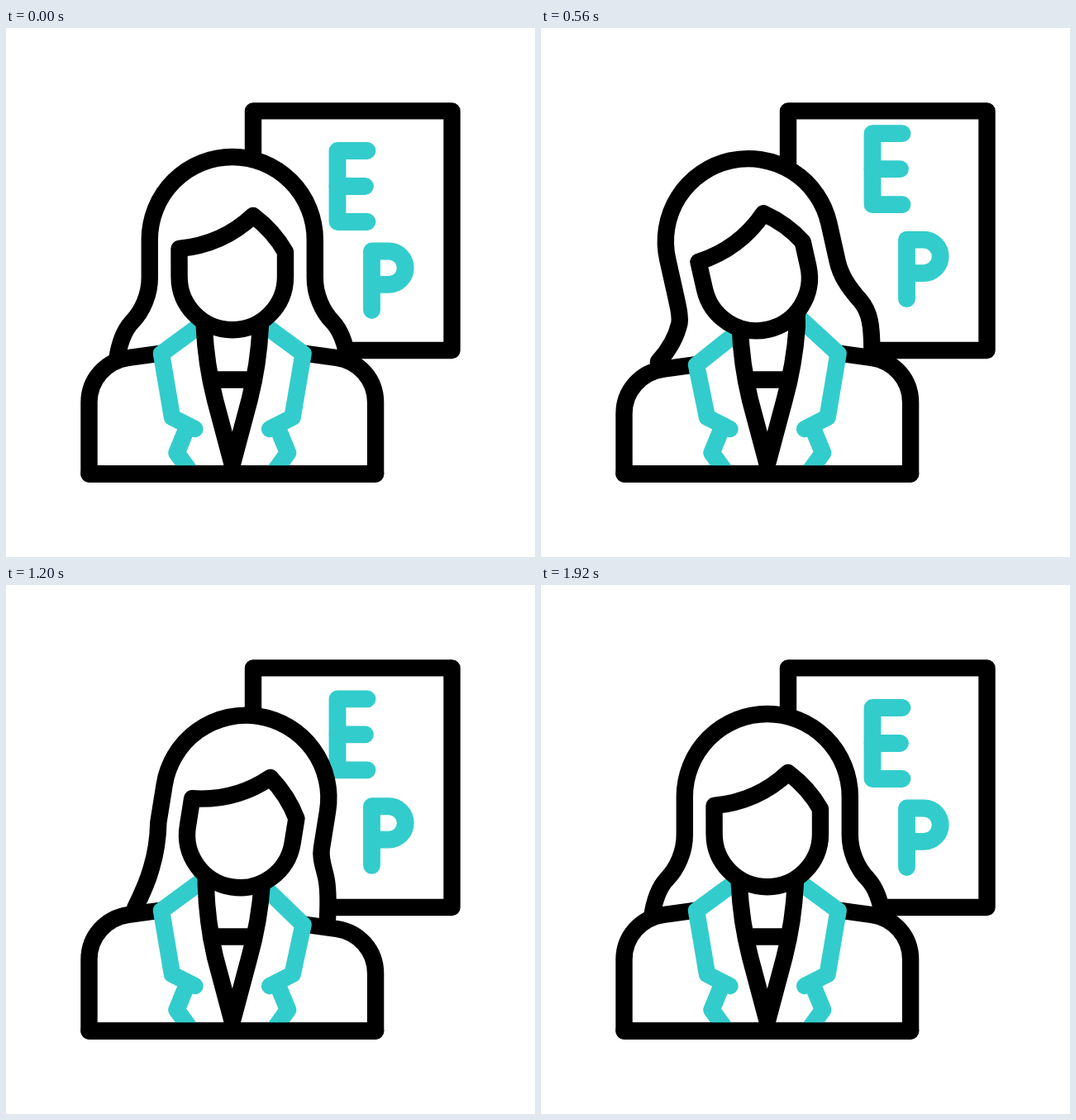
Animation of 640 by 640 pixels, one loop 2 s. Source, as an HTML page with a canvas:

```html
<!DOCTYPE html>
<html lang="en">
<head>
<meta charset="utf-8">
<title>Eye doctor icon</title>
<style>
  html, body { margin: 0; width: 100%; height: 100%; overflow: hidden; background: #fff; }
  canvas { display: block; width: 100vw; height: 100vh; }
</style>
</head>
<body>
<canvas id="stage" width="640" height="640"></canvas>
<script>
const ctx = document.getElementById('stage').getContext('2d');
const BLACK = '#000', TEAL = '#33cccc', WHITE = '#fff';
const LOOP = 2000, STEP = 40;
const CX = 273.8, LEFT = 100.5, RIGHT = 447.1, BASE = 539.5;
const PIVOT = [272, 361];

// Lower hair locks: two curves per side, from the head down to the shoulder.
const LOCK_REST = [174, 322, 165, 343, 152, 356, 142, 367, 137, 381, 134, 402];
const LOCKS = {
  left: {
    rest: LOCK_REST,
    tiltL: [165, 336, 169, 346, 168, 357, 165, 371, 157, 388, 142, 404],
    tiltR: [184, 305, 182, 322, 176, 342, 172, 357, 165, 373, 156, 391]
  },
  right: {
    rest: LOCK_REST.map((v, i) => i % 2 ? v : 2 * CX - v),
    tiltL: [362, 299, 372, 313, 386, 329, 398, 343, 400, 360, 400, 390],
    tiltR: [380, 330, 384, 340, 387, 353, 390, 366, 390, 383, 389, 404]
  }
};

function ease(t, from, to) {
  const x = Math.min(1, Math.max(0, (t - from) / (to - from)));
  return x * x * (3 - 2 * x);
}

// Two hops of 800 ms each.
function hop(t, start) {
  const p = t - start;
  if (p <= 0 || p >= 1600) return 0;
  const q = p % 800;
  return -21.4 * ease(q < 400 ? q : 800 - q, 0, 400);
}

function stroke(path, color, width = 20.4) {
  ctx.strokeStyle = color;
  ctx.lineWidth = width;
  ctx.stroke(path);
}

function fill(path) {
  ctx.fillStyle = WHITE;
  ctx.fill(path);
}

function poly(...pts) {
  const p = new Path2D();
  for (let i = 0; i < pts.length; i += 2) p.lineTo(pts[i], pts[i + 1]);
  return p;
}

function turn(x, y, a) {
  const dx = x - PIVOT[0], dy = y - PIVOT[1], c = Math.cos(a), s = Math.sin(a);
  return [PIVOT[0] + c * dx - s * dy, PIVOT[1] + s * dx + c * dy];
}

function lock(side, l, r) {
  const { rest, tiltL, tiltR } = LOCKS[side];
  return rest.map((v, i) => v * (1 - l - r) + tiltL[i] * l + tiltR[i] * r);
}

function hairPath(l, r, a) {
  const p = new Path2D();
  const n = lock('left', l, r), m = lock('right', l, r);
  const [cx, cy] = turn(CX, 256, a);
  p.moveTo(n[10], n[11]);
  p.bezierCurveTo(n[8], n[9], n[6], n[7], n[4], n[5]);
  p.bezierCurveTo(n[2], n[3], n[0], n[1], ...turn(CX - 100, 302, a));
  p.arc(cx, cy, 100, Math.PI + a, a);
  p.lineTo(...turn(CX + 100, 302, a));
  p.bezierCurveTo(...m.slice(0, 6));
  p.bezierCurveTo(...m.slice(6));
  return p;
}

function facePath(a) {
  const p = new Path2D();
  p.moveTo(...turn(209.5, 267, a));
  p.quadraticCurveTo(...turn(262, 262, a), ...turn(299, 227, a));
  p.quadraticCurveTo(...turn(324, 246, a), ...turn(338, 271, a));
  p.lineTo(...turn(338, 301, a));
  p.arc(...turn(CX, 301, a), 64.2, a, Math.PI + a);
  p.closePath();
  return p;
}

function bodyPath(dl, dr) {
  const p = new Path2D();
  p.moveTo(188, 393.5 + dl);
  p.lineTo(148, 399 + dl);
  p.bezierCurveTo(121, 403 + dl, LEFT, 425 + dl, LEFT, 453 + dl);
  p.lineTo(LEFT, BASE);
  p.lineTo(RIGHT, BASE);
  p.lineTo(RIGHT, 453 + dr);
  p.bezierCurveTo(RIGHT, 425 + dr, 427, 403 + dr, 400, 399 + dr);
  p.lineTo(360, 393.5 + dr);
  return p;
}

// side: 1 draws the left half, -1 its mirror image
const mirror = side => v => CX + side * (v - CX);

function lapel(side, drop, neckDrop) {
  const x = mirror(side);
  stroke(poly(x(235), 359.5 + neckDrop, x(188), 394 + drop, x(201), 471, x(228.5), 485), TEAL);
  stroke(poly(x(218), 486, x(206.5), 514, x(221), 534), TEAL);
}

function collar(side, shift) {
  const x = mirror(side);
  const p = new Path2D();
  p.moveTo(x(239.8) + shift, 344);
  p.lineTo(x(239.8) + shift, 362);
  p.quadraticCurveTo(x(242) + shift / 2, 407, x(253), 450);
  p.lineTo(x(CX), 528);
  stroke(p, BLACK);
}

function letters(t) {
  const e = hop(t, 200), p = 270 + hop(t, 320);
  stroke(poly(437, 148.5 + e, 401, 148.5 + e, 401, 234.5 + e, 437, 234.5 + e), TEAL, 20.8);
  stroke(poly(401, 191.5 + e, 434.5, 191.5 + e), TEAL, 20.8);
  const bowl = poly(442.5, p + 71.5, 442.5, p, 463, p);
  bowl.arc(463, p + 20.2, 20.2, -Math.PI / 2, Math.PI / 2);
  bowl.lineTo(442.5, p + 40.4);
  stroke(bowl, TEAL, 20.8);
}

function draw(t) {
  const l = ease(t, 200, 600) - ease(t, 760, 1200);
  const r = ease(t, 760, 1200) - ease(t, 1360, 1760);
  const a = (-13 * l + 9.1 * r) * Math.PI / 180;
  const dl = 14 * l, dr = 17 * r;

  ctx.fillStyle = WHITE;
  ctx.fillRect(0, 0, 640, 640);
  ctx.lineCap = ctx.lineJoin = 'round';

  const board = poly(299, 100.4, 539.5, 100.4, 539.5, 390, 299, 390);
  board.closePath();
  stroke(board, BLACK);
  letters(t);

  const hair = hairPath(l, r, a), body = bodyPath(dl, dr), face = facePath(a);
  const backing = new Path2D(hair);
  backing.lineTo(CX, 480);
  fill(backing);
  fill(body);
  stroke(hair, BLACK);
  stroke(body, BLACK);

  lapel(1, dl, 11 * l);
  lapel(-1, dr, 6 * r - 9 * l);
  stroke(poly(LEFT, BASE, RIGHT, BASE), BLACK);
  stroke(poly(248, 425.5, 299, 425.5), BLACK);
  collar(1, l + 2 * r);
  collar(-1, 2 * (l + r));

  fill(face);
  stroke(face, BLACK);
}

const start = performance.now();
function tick() {
  const t = (performance.now() - start) % LOOP;
  draw(Math.floor(t / STEP) * STEP);
  requestAnimationFrame(tick);
}
tick();
</script>
</body>
</html>
```
